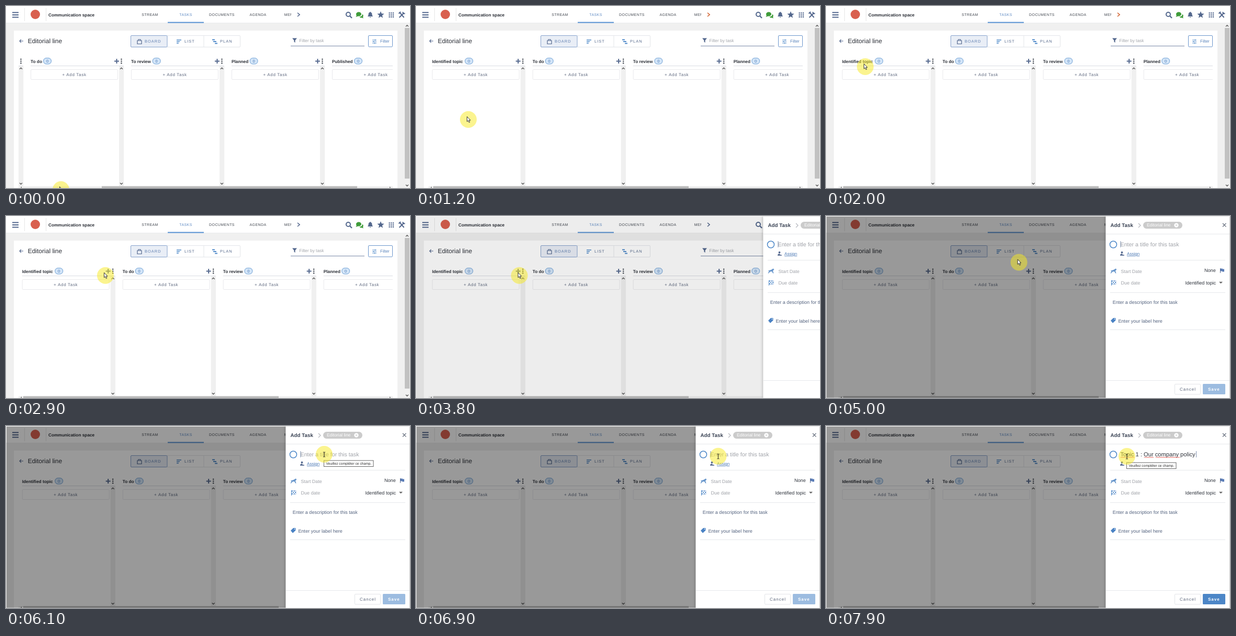
Recreate the animation shown at these times as an HTML page. Size 772 px wide and 348 px high, loop 8 s.

```html
<!DOCTYPE html>
<html lang="en">
<head>
<meta charset="utf-8">
<title>Task board</title>
<style>
  html, body { margin: 0; width: 100%; height: 100%; overflow: hidden; background: #fff; }
  svg { display: block; width: 772px; height: 348px; font-family: "Liberation Sans", Arial, sans-serif; text-rendering: geometricPrecision; }
</style>
</head>
<body>
<svg id="stage" viewBox="0 0 772 348"></svg>
<script>
const LOOP = 8000, STEP = 100;
const INK = '#53678d', BLUE = '#508ac9', DARK = '#2a2e36', GREY = '#a0a3a9';

// Markup helpers
const text = (x, y, size, str, fill = DARK, more = '') =>
  `<text x="${x}" y="${y}" font-size="${size}" fill="${fill}" ${more}>${str}</text>`;
const rect = (x, y, w, h, fill, more = '') =>
  `<rect x="${x}" y="${y}" width="${w}" height="${h}" fill="${fill}" ${more}/>`;
const fillPath = (d, fill = INK, more = '') => `<path d="${d}" fill="${fill}" ${more}/>`;
const stroke = (d, color = INK, width = 1, more = '') =>
  `<path d="${d}" fill="none" stroke="${color}" stroke-width="${width}" ${more}/>`;
const dot = (x, y, r, fill, more = '') => `<circle cx="${x}" cy="${y}" r="${r}" fill="${fill}" ${more}/>`;
const group = (id, body, more = '') => `<g id="${id}" ${more}>${body}</g>`;
const MID = 'text-anchor="middle"', BOLD = 'font-weight="bold"';
const spaced = n => `letter-spacing="${n}"`;
const arrow = (x, y, dir) => stroke(`M${x - 2.5} ${y + 1.2 * dir}l2.5 ${-2.5 * dir}l2.5 ${2.5 * dir}`, '#555', 1.3);
const sideArrow = (x, dir) => fillPath(`M${x} 345l${2 * dir} 2l${-2 * dir} 2z`, '#777');

function header() {
  const tabs = [['STREAM', 275], ['TASKS', 343.5], ['DOCUMENTS', 412.5], ['AGENDA', 481.5]];
  const star = Array.from({ length: 10 }, (_, i) => {
    const r = i % 2 ? 3 : 7, a = i * Math.PI / 5;
    return `${716 + r * Math.sin(a)} ${17 - r * Math.cos(a)}`;
  }).join('L');
  let grid = '';
  for (let i = 0; i < 9; i++) grid += rect(731.5 + i % 3 * 3.7, 12.3 + Math.floor(i / 3) * 3.7, 2.3, 2.3, INK);
  return rect(0, 0, 772, 32, '#fff') + rect(0, 32, 772, 1, '#eaebed') +
    stroke('M12 12.5h12M12 17h12M12 21.5h12', INK, 2) +
    stroke('M35.5 4v25M76.5 4v25', '#e6e6e6') +
    dot(56, 16, 9, '#d9604f') +
    text(81, 20, 8.27, 'Communication space', DARK, BOLD) +
    tabs.map(([s, x]) => text(x, 19.3, 7, s, s === 'TASKS' ? '#5f8bc4' : '#444952', MID + spaced(.42))).join('') +
    `<svg x="531" y="8" width="14" height="18">${text(.7, 11.3, 7, 'MEMBERS', '#444952', spaced(.42))}</svg>` +
    rect(309, 30.5, 69, 2, '#5690d2') +
    stroke('M557 13l4 3.5l-4 3.5', INK, 1.6, 'id="chevron"') +
    `<circle cx="654" cy="16" r="4" fill="none" stroke="${INK}" stroke-width="2"/>` + stroke('M657 19l4 4', INK, 2.4) +
    fillPath('M669 15.5a5 4 0 1 1 5 4l-2.5 .3l-3 1.5l1.2-2.5z', '#3f9b3a') +
    fillPath('M675.5 20.5q5 0 5.5-5q3 2.5 1 5.5l1 2.5l-3-1q-4 .5-4.5-2z', '#3f9b3a') +
    fillPath('M691 20q1.7-1.5 1.7-4.5q0-3 2.7-3.6v-1h1.3v1q2.7 .6 2.7 3.6q0 3 1.7 4.5zM694.5 21h3q-1.5 2.6-3 0z') +
    fillPath(`M${star}z`) + grid +
    stroke('M752.5 12.5l8 9.5M760.5 13l-9 9', INK, 2) + stroke('M750.5 14.5l3.5-3.5M758 11.5l1.5 3l3 0', INK, 2);
}

function toolbar() {
  const outline = 'stroke="#e3e5e9"';
  return rect(15, 47, 733, 301, '#fff') +
    stroke('M33 67h-7m3-3l-3 3l3 3', INK, 1.2) +
    text(41.7, 71, 12, 'Editorial line') +
    rect(238.5, 56.5, 209, 22, '#fff', outline + ' rx="1.5"') + stroke('M378 57v21', '#e3e5e9') +
    rect(238.5, 56.5, 69.5, 22, '#e9eef6', 'stroke="#86a2cc" rx="1.5"') +
    stroke('M251 66h8v6.5h-8zM253 66v-2h4v2', INK, 1.2) +
    stroke('M326 65h9M326 68h6M326 71h4', BLUE, 1.7) +
    stroke('M394 64.5h5M396 68h6M399 71.5h5', BLUE, 1.8) +
    ['BOARD', 'LIST', 'PLAN'].map((s, i) =>
      text([265, 341, 409][i], 70.3, 7.5, s, i ? '#5b6e90' : '#6482b2', spaced(1))).join('') +
    fillPath('M547 61.5h9l-3.4 4.3v4.2l-2.2-1.5v-2.7z') +
    text(560.3, 69, 8.3, 'Filter by task', GREY) + rect(544, 76, 141, 1, '#7786a5') +
    rect(692.5, 56.5, 46, 21.5, '#fff', 'stroke="#6a95cc" rx="1.5"') +
    stroke('M700 65h8M700 68h8M700 71h8', BLUE, .9) + stroke('M705.5 64v2M702.5 67v2M704.5 70v2', BLUE, 1.2) +
    text(715, 70, 8, 'Filter', '#5580ba');
}

function board() {
  const columns = [['Identified topic', 70.5], ['To do', 32], ['To review', 48.7], ['Planned', 42.5], ['Published', 50]];
  return columns.map(([name, badge], i) => `<g transform="translate(${30.7 + 192 * i} 0)">` +
    text(0, 108.5, 8.3, name, DARK, BOLD) +
    rect(badge - 7.5, 99.5, 15, 11.5, '#d3e5f8', 'stroke="#6d9fd4" rx="5.5"') +
    text(badge, 108.3, 7.5, '0', '#4a78b2', MID) +
    stroke('M160 105.5h9M164.5 101v9', INK, 2) +
    [101.7, 105.5, 109.3].map(y => dot(173.5, y, 1.25, '#414750')).join('') +
    rect(0, 114, 178, 1, '#d9dbe2') +
    rect(169, 115, 9.3, 230, '#f0f0f0') + arrow(173.5, 119.5, 1) + arrow(173.5, 339.5, -1) +
    rect(.5, 121.5, 166, 19, '#fff', 'stroke="#e9e9ec" rx="1.5"') +
    text(83.5, 134.2, 8, '+ Add Task', '#5f697f', MID + spaced(.7)) + '</g>').join('');
}

function drawer() {
  const rule = y => rect(543, y, 220, 1, '#e6e8eb');
  return rect(534.5, 1, 237, 347, '#fff', 'filter="url(#shade)"') +
    text(543.5, 21, 9.8, 'Add Task', '#3a4354', BOLD) +
    stroke('M597 14l4 4l-4 4', '#b4b7bd', 1.2) +
    rect(606, 11, 75, 13.3, '#cbcbcb', 'rx="6.6"') + text(613, 20.4, 8.35, 'Editorial line', '#fff') +
    dot(669.5, 17.6, 4.2, '#fff') + stroke('M668 16.1l3 3m0-3l-3 3', '#c4c4c4') +
    stroke('M758 14l6.5 6.5m0-6.5l-6.5 6.5', '#5f6877', 1.2) +
    rect(535, 34, 236, 1, '#e6e8eb') +
    `<circle cx="549" cy="54.5" r="6.5" fill="#fff" stroke="${BLUE}" stroke-width="1.6"/>` +
    group('hint', text(562.5, 58, 10.72, 'Enter a title for this task', GREY)) +
    group('title', text(562.5, 58, 11.15, 'Topic 1 : Our company policy', '#30343c')) +
    group('squiggles', [[563, 26], [608, 18], [630, 46]].map(([x, w]) =>
      stroke(`M${x} 60.5` + 'l1-1l1 1'.repeat(w / 2), '#e0392f', .9)).join('')) +
    rect(562.5, 48, 1, 12, '#7f90ad', 'id="caret"') +
    dot(565.5, 69.7, 1.9, INK) + fillPath('M562 75.8q0-3.6 3-3.6q1.5 0 2 1.8l3 .6v1.2z') +
    text(575, 75, 8.1, 'Assign', '#4675b2', 'text-decoration="underline"') +
    rule(84) +
    fillPath('M543.5 109.5l2-3.5l-1.5-1.5l5.5-1.5l4-2.5l2 1.5l-2.5 3l1.5 4.5h-1.5l-2-3.5l-3.5 .5l-2.5 3z', '#6997cc') +
    stroke('M753.5 100v9', INK) + fillPath('M754 100.5h3.5l.5 1h3v5h-3.5l-.5-1h-3z', '#5a7cb6') +
    text(563.5, 108.7, 8.95, 'Start Date', GREY) + text(723, 107, 9.1, 'None', '#2d323b') +
    stroke('M545.5 123v10', BLUE) + stroke('M546 124.5h8M546 129.5h8', BLUE, 1.6, 'stroke-dasharray="2"') +
    stroke('M548 127h7', BLUE, 1.8, 'stroke-dasharray="2"') + stroke('M546 123.5h8v7h-8', '#86abd8', .7) +
    text(563.5, 131.3, 9.1, 'Due date', GREY) + text(686.5, 130.7, 9.1, 'Identified topic', '#2d323b') +
    fillPath('M751 125.8h7l-3.5 3.5z', '#666') +
    rule(146) + text(547.7, 167.7, 9.05, 'Enter a description for this task', '#54637f') +
    fillPath('M544 200l5-5h4.5v4.5l-5.5 5.2z', '#4a82c4') + dot(551.5, 197, .9, '#fff') +
    text(558.5, 203.9, 9.1, 'Enter your label here', '#54637f') + rule(217) +
    rect(535, 314, 236, 1, '#e6e8eb') +
    rect(666.5, 321.5, 49, 19.5, '#fff', 'stroke="#e3e5e9" rx="1.5"') +
    text(676, 334, 8, 'Cancel', '#586378', spaced(1)) +
    rect(720, 321, 43, 20, '#4c86c7', 'rx="1.5" id="save"') +
    text(730, 334, 8, 'Save', '#fff', spaced(1) + BOLD);
}

const stage = document.getElementById('stage');
stage.innerHTML =
  '<defs><clipPath id="lanes"><rect x="24" y="90" width="715" height="255"/></clipPath>' +
  '<filter id="shade" x="-10%" width="120%"><feDropShadow dx="-1" dy="0" stdDeviation="2.5" flood-opacity=".25"/></filter></defs>' +
  rect(0, 0, 772, 348, '#f0f0f0') + header() + toolbar() +
  `<g clip-path="url(#lanes)">${group('board', board())}</g>` +
  rect(24, 344.5, 715, 4, '#f0f0f0') + sideArrow(30, -1) + sideArrow(733, 1) +
  rect(33, 344.5, 488, 4, '#bcbcbc', 'id="thumb"') +
  rect(762, 33, 10, 315, '#f1f1f1') + rect(762, 42, 9, 288, '#c1c1c1') + arrow(766.5, 38, 1) + arrow(766.5, 343, -1) +
  rect(1, 1, 771, 346.5, '#000', 'id="overlay"') +
  group('drawer', drawer()) +
  group('tooltip', rect(0, 0, 94.5, 11.5, '#fff', 'stroke="#666"') +
    text(4, 8.4, 6.68, 'Veuillez compléter ce champ.', '#2a2a2a')) +
  group('cursor', dot(0, 0, 16, '#f8ea20', 'opacity=".5"') +
    fillPath('M-2.5-5.5v9.5l2.1-2l1.7 3.7l1.6-.7l-1.7-3.6h2.9z', '#fff', 'stroke="#222" stroke-width=".9" id="pointer"') +
    stroke('M-2-4h1.5l.5 .5l.5-.5h1.5M0-3.5v8M-2 5h1.5l.5-.5l.5 .5h1.5', '#222', 1, 'id="beam"'));

const el = {};
stage.querySelectorAll('[id]').forEach(node => el[node.id] = node);

// Motion
const clamp = v => Math.max(0, Math.min(1, v));
const ramp = (t, a, b) => clamp((t - a) / (b - a));
const smooth = u => u * u * (3 - 2 * u);
const PATH = [
  [0, 105, 351], [1100, 105, 351], [1200, 100, 217], [1300, 97, 182], [1400, 97, 182],
  [1800, 47, 116], [2000, 75, 116], [2100, 92, 115], [2300, 62, 115], [3000, 197.5, 113.7],
  [4600, 197.5, 113.7], [5500, 608, 53], [5600, 608, 54], [6400, 608, 54], [7000, 575, 58], [LOOP, 575, 58]
];
function cursorAt(t) {
  const i = PATH.findIndex(p => p[0] > t);
  const [t0, x0, y0] = PATH[i - 1], [t1, x1, y1] = PATH[i];
  const u = smooth(ramp(t, t0, t1));
  return [x0 + (x1 - x0) * u, y0 + (y1 - y0) * u];
}
const set = (node, name, value) => node.setAttribute(name, value);
const show = (node, on) => set(node, 'visibility', on ? 'visible' : 'hidden');
const move = (node, x, y) => set(node, 'transform', `translate(${x} ${y})`);

function render(t) {
  const scroll = 1 - smooth(ramp(t, 0, 500));
  move(el.board, -175.7 * scroll, 0);
  move(el.thumb, 150 * scroll, 0);
  set(el.chevron, 'stroke', t >= 100 && t < 2400 ? '#d2622f' : INK);

  const open = t >= 3800;
  show(el.overlay, open);
  show(el.drawer, open);
  set(el.overlay, 'opacity', t < 3900 ? .07 : .35 + .05 * ramp(t, 3900, 4200));
  move(el.drawer, t < 3900 ? 129 : 0, 0);

  const [x, y] = cursorAt(t);
  const overField = x > 562 && y < 65;
  move(el.cursor, x, y);
  show(el.pointer, !overField);
  show(el.beam, overField);
  move(el.tooltip, x - .5, y + 12);
  show(el.tooltip, (t >= 6000 && t < 6500) || t >= 7100);

  const filled = t >= 7600;
  show(el.hint, open && !filled);
  show(el.title, filled);
  show(el.squiggles, t >= 7700);
  set(el.caret, 'x', filled ? 707 : 562.5);
  set(el.save, 'opacity', .55 + .45 * ramp(t, 7500, 7800));
}

function tick() {
  render(Math.floor(performance.now() % LOOP / STEP) * STEP);
  requestAnimationFrame(tick);
}
tick();
</script>
</body>
</html>
```
